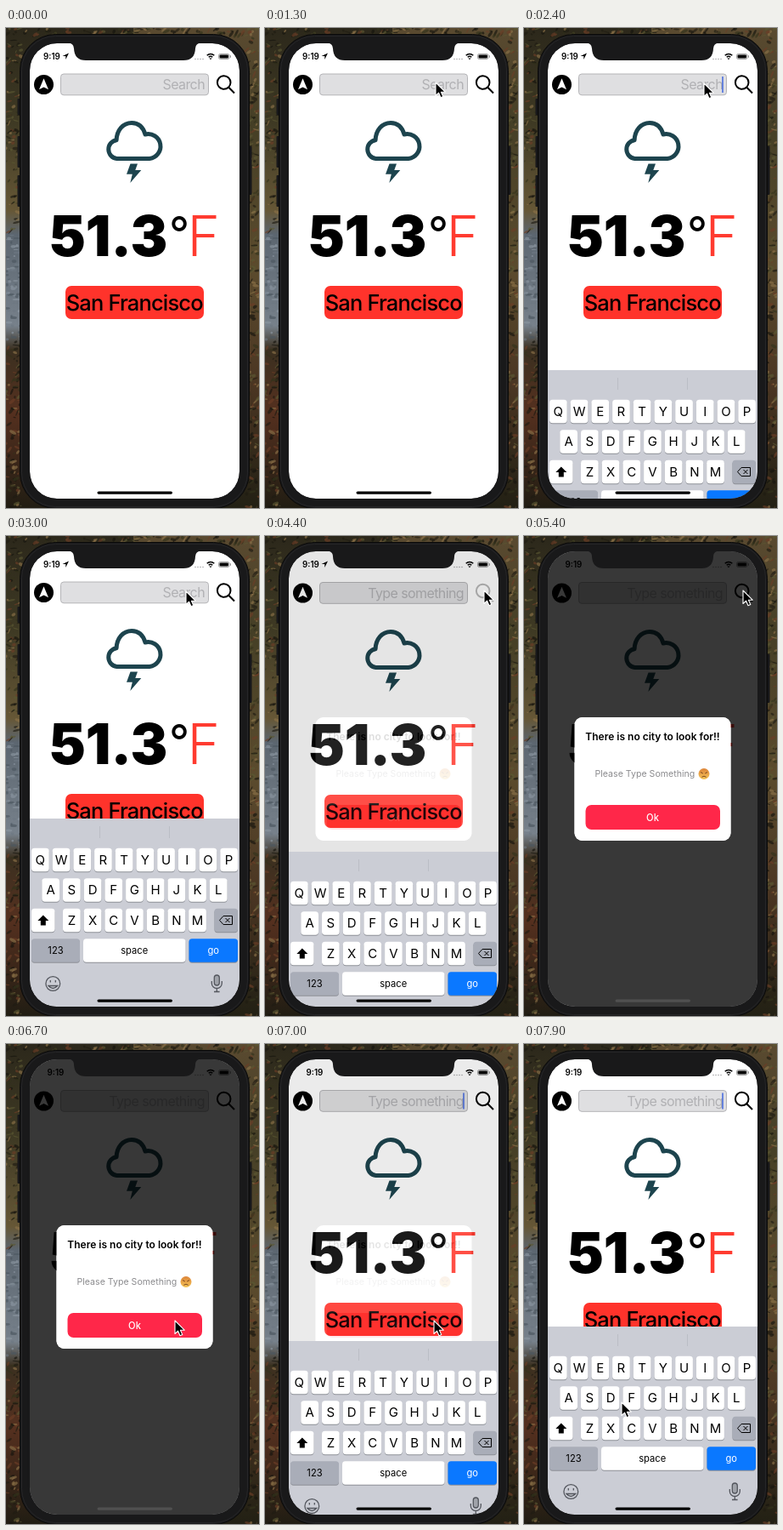
Write an HTML page that moves like this. It is 298x564 px and loops after 8000 ms.

```html
<!DOCTYPE html>
<html lang="en">
<head>
<meta charset="utf-8">
<title>Weather search</title>
<style>
html, body { margin: 0; width: 100%; height: 100%; overflow: hidden; background: #2c291b; }
svg { display: block; width: 298px; height: 564px; }
text { font-family: Inter, Roboto, sans-serif; }
.mid { text-anchor: middle; }
</style>
</head>
<body>
<svg viewBox="0 0 298 564" xmlns="http://www.w3.org/2000/svg">
  <defs>
    <linearGradient id="left" x1="0" y1="0" x2="0" y2="1">
      <stop offset="0" stop-color="#2c281b"/><stop offset=".2" stop-color="#3f3a24"/>
      <stop offset=".38" stop-color="#665736"/><stop offset=".43" stop-color="#5c6670"/>
      <stop offset=".62" stop-color="#77818b"/><stop offset=".67" stop-color="#3b3020"/>
      <stop offset=".8" stop-color="#55301f"/><stop offset="1" stop-color="#211d13"/>
    </linearGradient>
    <linearGradient id="right" x1="0" y1="0" x2="0" y2="1">
      <stop offset="0" stop-color="#5a4a30"/><stop offset=".2" stop-color="#453f26"/>
      <stop offset=".5" stop-color="#5b4b2d"/><stop offset=".75" stop-color="#4a3522"/>
      <stop offset="1" stop-color="#222014"/>
    </linearGradient>
    <linearGradient id="angry" x1="0" y1="0" x2="0" y2="1">
      <stop offset="0" stop-color="#dc8338"/><stop offset="1" stop-color="#f5c658"/>
    </linearGradient>
    <clipPath id="screen"><rect x="28" y="18" width="247" height="535" rx="32"/></clipPath>
  </defs>

  <rect width="150" height="564" fill="url(#left)"/>
  <rect x="150" width="148" height="564" fill="url(#right)"/>
  <g id="scrub"></g>

  <g fill="#17171a">
    <rect x="13.5" y="83" width="4" height="19" rx="1"/>
    <rect x="13.5" y="127" width="4" height="37" rx="1"/>
    <rect x="13.5" y="173" width="4" height="37" rx="1"/>
    <rect x="285.5" y="139" width="4" height="57" rx="1"/>
  </g>
  <rect x="16.5" y="7.5" width="270" height="557" rx="42" fill="#19191a" stroke="#0a0a0a"/>
  <rect x="18.5" y="9.5" width="266" height="553" rx="40" fill="none" stroke="#262628"/>

  <g clip-path="url(#screen)">
    <rect x="28" y="18" width="247" height="535" fill="#fff"/>
    <text id="clock" x="44" y="37" font-size="9.8" font-weight="600">9:19</text>
    <path id="gps" d="M74 29.5 66.5 33H70.3V37Z"/>
    <g fill="#a5a5a8"><circle cx="223" cy="36.5" r=".8"/><circle cx="226" cy="36.5" r=".8"/><circle cx="229" cy="36.5" r=".8"/><circle cx="232" cy="36.5" r=".8"/></g>
    <path d="M236.7 32.2a6.2 6.2 0 0 1 8.6 0M238.7 34.3a3.4 3.4 0 0 1 4.6 0" fill="none" stroke="#000" stroke-width="1.5"/>
    <path d="M239.4 35.4h3.2L241 37.2Z"/>
    <rect x="250.5" y="30.5" width="12.5" height="6" rx="1.8" fill="none" stroke="#8a8a8a" stroke-width=".8"/>
    <rect x="251.5" y="31.5" width="10.5" height="4" rx="1"/>
    <path d="M264.3 32.2v2.6" stroke="#8a8a8a"/>

    <g id="bar">
      <circle cx="44.5" cy="66.5" r="11.5"/>
      <path d="M44.5 59.3 50 72.3 44.5 69.4 39 72.3Z" fill="#fff"/>
      <rect x="64.5" y="54" width="174" height="24.8" rx="3.5" fill="#dfdfe1" stroke="#b4b4b7"/>
      <text id="hint" x="234" y="72" font-size="16" letter-spacing="-.6" text-anchor="end" fill="#b1b1b4"></text>
      <path id="caret" d="M234 57v19" stroke="#4166dd" stroke-width="1.5"/>
      <g id="lens" fill="none" stroke="#000" stroke-width="2">
        <circle cx="256.7" cy="64" r="7.8"/><path d="M262.3 69.7 269 76.5"/>
      </g>
    </g>

    <g id="weather">
      <path d="M130.500 153.500a11 11 0 0 1-.4-21.800C130.500 120 138 111.500 148 111.500 156 111.500 161.500 116.500 164 125A14.500 14.500 0 1 1 169 153.500Z" fill="none" stroke="#1d444e" stroke-width="5" stroke-linejoin="round"/>
      <path d="M146.500 159.500H155L152.300 167H159.300L146.300 182 148.800 171.800H142Z" fill="#1d444e"/>
      <text x="51.5" y="268" font-size="65.5" font-weight="900">51.3</text>
      <text class="mid" x="204" y="260" font-size="53">°</text>
      <text x="213.5" y="268" font-size="65.5" font-weight="350" fill="#ff3b30">F</text>
      <rect x="70" y="303" width="163" height="39" rx="7" fill="#ff332b"/>
      <text class="mid" x="151.2" y="332" font-size="25.5" font-weight="500" letter-spacing="-.85">San Francisco</text>
    </g>

    <path id="dim" fill-rule="evenodd" d="M28 18H275V553H28ZM68.500 213a9 9 0 0 0-9 9V349a9 9 0 0 0 9 9H234.500a9 9 0 0 0 9-9V222a9 9 0 0 0-9-9Z"/>
    <g id="alert">
      <rect x="59.5" y="213" width="184" height="145" rx="9" fill="#fff"/>
      <text class="mid" x="151.5" y="240" font-size="12" font-weight="600">There is no city to look for!!</text>
      <text x="83.5" y="283" font-size="10.6" fill="#8b8b8e">Please Type Something</text>
      <circle cx="212" cy="279.5" r="6.5" fill="url(#angry)"/>
      <path d="M208 277.500l2.800 1.500M216 277.500l-2.800 1.500M209.300 283.300q2.700-2.200 5.400 0" fill="none" stroke="#7d4a20"/>
      <rect x="72.5" y="316" width="158.5" height="29" rx="7" fill="#ff2749"/>
      <text class="mid" x="151.5" y="334.5" font-size="11.2" font-weight="500" fill="#fff">Ok</text>
    </g>

    <g id="keys">
      <rect x="28" y="332" width="247" height="230" fill="#cbcdd5"/>
      <path d="M110.500 341v14M192.500 341v14" stroke="#bbbec6"/>
    </g>
    <rect id="home" x="107.5" y="544.5" width="88.5" height="3.2" rx="1.6"/>
  </g>
  <rect x="27" y="17" width="249" height="537" rx="33" fill="none" stroke="#19191a" stroke-width="2"/>
  <path d="M72 17Q80 18 80 24 80.500 38 94 38H209Q222.500 38 223 24 223 18 231 17Z" fill="#19191a"/>
  <path id="arrow" d="M0 0V15.500L3.600 12.200 6 17.800 8.800 16.600 6.400 11.200H11.200Z" fill="#000" stroke="#fff" stroke-width="1.1" stroke-linejoin="round"/>
</svg>
<script>
const $ = id => document.getElementById(id);

function add(parent, tag, attrs, label) {
  const el = document.createElementNS('http://www.w3.org/2000/svg', tag);
  for (const k in attrs) el.setAttribute(k, attrs[k]);
  if (label) el.textContent = label;
  return parent.appendChild(el);
}

// Hillside brush around the phone
let seed = 11;
const rnd = () => (seed = seed * 16807 % 2147483647) / 2147483647;
const tones = ['#15140e', '#1e1c12', '#5a5733', '#8c7148', '#33331c', '#6b3d26'];
const water = ['#8b95a0', '#4c5660', '#6d7883'];
for (let i = 0; i < 620; i++) {
  const side = rnd(), top = side >= .86, y = top ? rnd() * 9 : rnd() * 564;
  const x = top ? rnd() * 298 : side < .46 ? rnd() * 20 : 283 + rnd() * 15;
  const wet = x < 21 && y > 242 && y < 366;
  const set = wet ? water : tones;
  add($('scrub'), 'ellipse', {
    rx: 1 + rnd() * 3.5, ry: .6 + rnd() * 1.3,
    fill: set[Math.floor(rnd() * set.length)], opacity: .65,
    transform: `translate(${x} ${y}) rotate(${wet ? 0 : rnd() * 100 - 70})`
  });
}

// Keyboard
const keys = $('keys');
function key(x, y, w, label, size, fill = '#fff', ink = '#000') {
  add(keys, 'rect', { x, y: y + 1, width: w, height: 27.5, rx: 3.6, fill: '#8d9097' });
  add(keys, 'rect', { x, y, width: w, height: 27.5, rx: 3.6, fill });
  if (label) add(keys, 'text', {
    class: 'mid', x: x + w / 2, y: y + 13.8 + size * .36, 'font-size': size, fill: ink
  }, label);
}
const rows = [['QWERTYUIOP', 30], ['ASDFGHJKL', 42.3], ['ZXCVBNM', 67]];
rows.forEach(([row, x0], r) =>
  [...row].forEach((c, i) => key(x0 + i * 24.7, 366.7 + r * 35.5, 20.7, c, 15)));
const gray = '#a9adb8';
key(30, 437.7, 27.5, '', 0);
key(245.5, 437.7, 27.5, '', 0, gray);
key(30, 473.2, 57, '123', 11.2, gray);
key(91, 473.2, 120.5, 'space', 11.2);
key(215.5, 473.2, 57.5, 'go', 11.2, '#0a78ff', '#fff');
add(keys, 'path', { d: 'M43.8 445.5 50.3 452H46.8V457.5H40.8V452H37.3Z' });
const line = { fill: 'none', stroke: '#000', 'stroke-width': 1 };
add(keys, 'path', { ...line, d: 'M251.5 451.5 256 446.5H266.5V456.5H256ZM258.5 449l5 5M263.5 449l-5 5' });
const thin = { fill: 'none', stroke: '#53565d', 'stroke-width': 1.3 };
add(keys, 'circle', { ...thin, cx: 55.3, cy: 526, r: 8.4 });
add(keys, 'path', { ...thin, d: 'M50 528.5q5.3 6 10.6 0ZM52.3 522v2.5M58.3 522v2.5' });
add(keys, 'rect', { ...thin, x: 245.3, y: 516, width: 6, height: 12, rx: 3, fill: '#a0a3aa' });
add(keys, 'path', { ...thin, d: 'M242.3 523v2.5a6 6 0 0 0 12 0V523M248.3 531.5v4M245 535.5h6.6' });

// Tracks: [time, value, ...]
const DARK = .78;
const drop = [[2200, 221], [2300, 150], [2400, 70], [2500, 25], [2600, 6], [2700, 0],
  [4300, 0], [4400, 39], [4500, 110], [4600, 170], [4700, 203], [4800, 221],
  [6700, 221], [6800, 130], [6900, 55], [7000, 17], [7100, 4], [7200, 0]];
const shade = [[4300, 0], [4400, .1], [4500, .32], [4600, .58], [4700, DARK],
  [6700, DARK], [6800, .5], [6900, .25], [7000, .08], [7100, 0]];
const mouse = [[1000, 236, 128], [1300, 201, 64], [2000, 201, 64], [2300, 212, 65],
  [3400, 212, 65], [4000, 258, 64], [5700, 258, 64], [6500, 199, 325],
  [7200, 199, 325], [7900, 115, 421]];

function at(track, t, col = 1, ease = p => p) {
  if (t <= track[0][0]) return track[0][col];
  const i = track.findIndex(k => k[0] >= t);
  if (i < 0) return track[track.length - 1][col];
  const a = track[i - 1], b = track[i];
  return a[col] + (b[col] - a[col]) * ease((t - a[0]) / (b[0] - a[0]));
}
const smooth = p => p * p * (3 - 2 * p);
const show = (id, on) => $(id).setAttribute('opacity', +on);
const move = (id, x, y) => $(id).setAttribute('transform', `translate(${x} ${y})`);

function draw(t) {
  const dark = at(shade, t), tried = t >= 4300, located = t < 5000;
  move('keys', 0, at(drop, t));
  move('weather', 0, tried ? 1 : 0);
  move('bar', 0, tried ? .5 : 0);
  move('arrow', at(mouse, t, 1, smooth), at(mouse, t, 2, smooth));
  move('clock', located ? 0 : 4.5, 0);
  show('arrow', t >= 1000);
  show('dim', dark);
  show('alert', dark / DARK);
  show('gps', located);
  show('lens', t >= 4200 && t < 4500 ? .28 : 1);
  const typing = t >= 2300 && t < 4300 ? t - 2300 : t >= 6800 ? t - 6800 : 900;
  show('caret', typing % 1000 < 500);
  $('hint').textContent = tried ? 'Type something' : 'Search';
  const g = Math.round(dark / DARK * 80);
  $('home').setAttribute('fill', `rgb(${g},${g},${g})`);
}

let start;
function tick(now) {
  start ??= now;
  draw(Math.floor((now - start) % 8000 / 100) * 100);
  requestAnimationFrame(tick);
}
draw(0);
requestAnimationFrame(tick);
</script>
</body>
</html>
```
